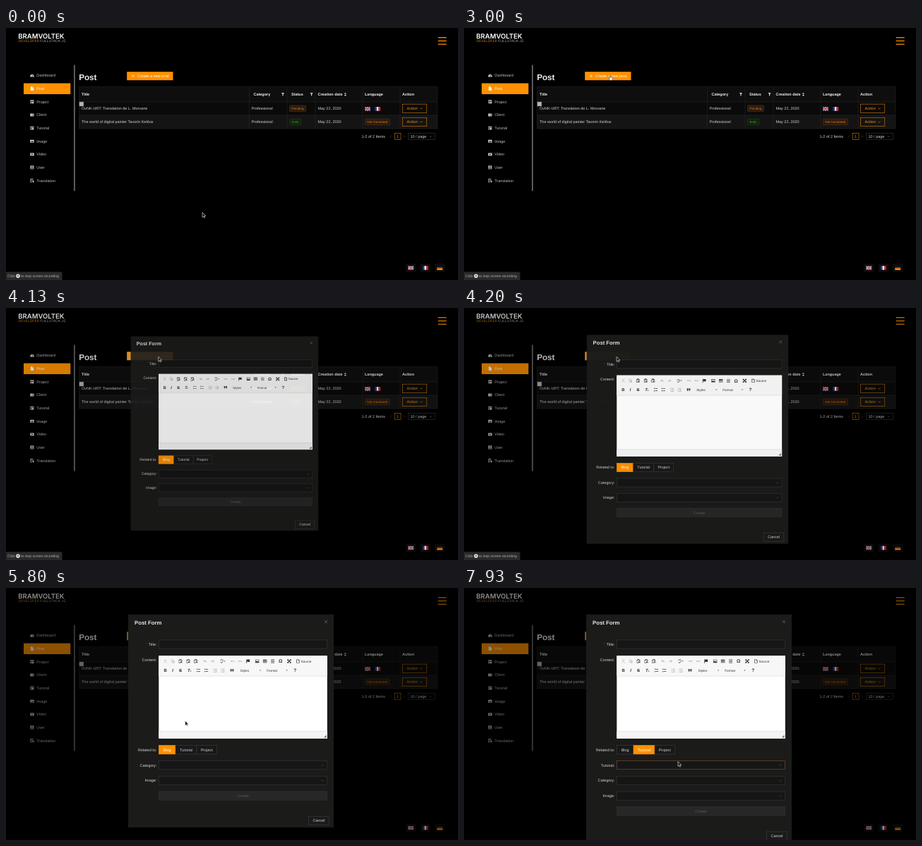
An HTML page for the animation above (8000 ms loop, 640 by 358 pixels).

```html
<!DOCTYPE html>
<html lang="en">
<head>
<meta charset="utf-8">
<title>Post admin</title>
<style>
  html, body { margin: 0; width: 100%; height: 100%; overflow: hidden; background: #000; }
  svg { display: block; width: 100vw; height: 100vh; }
  text { font-family: "Liberation Sans", Arial, sans-serif; text-rendering: geometricPrecision; white-space: pre; }
  .brand { font-family: Inter, sans-serif; }
</style>
</head>
<body>
<svg id="stage" viewBox="0 0 640 358" xmlns="http://www.w3.org/2000/svg"></svg>
<script>
const ORANGE = '#ff9100', LINE = '#2b2b2b', SOFT = '#d4d4d4', BODY = 5.47, ROW = 21.9;

// Drawing helpers
const text = (x, y, s, fill = SOFT, size = BODY, more = '') =>
  `<text x="${x}" y="${y}" fill="${fill}" font-size="${size}" ${more}>${s}</text>`;
const bold = (x, y, s, fill = '#f0f0f0', size = BODY) => text(x, y, s, fill, size, 'font-weight="700"');
const rect = (x, y, w, h, fill = 'none', stroke = 'none', more = '') =>
  `<rect x="${x}" y="${y}" width="${w}" height="${h}" fill="${fill}" stroke="${stroke}" stroke-width=".5" ${more}/>`;
const line = (d, stroke, width = .6, more = '') =>
  `<path d="${d}" fill="none" stroke="${stroke}" stroke-width="${width}" ${more}/>`;
const shape = (d, fill, more = '') => `<path d="${d}" fill="${fill}" fill-rule="evenodd" ${more}/>`;
const chevron = (x, y, color = '#777') => line(`M${x - 1.7} ${y - .8}l1.7 1.7 1.7-1.7`, color, .55);
const group = (s, more = '') => `<g ${more}>${s}</g>`;
const at = (x, y, s) => group(s, `transform="translate(${x} ${y})"`);

const stripes = (colors, down) => colors.map((c, i) => down
  ? rect(0, i * 1.9, 8, 1.9, c) : rect(i * 2.67, 0, 2.67, 5.7, c)).join('');
const flags = {
  uk: rect(0, 0, 8, 5.7, '#1f2f6f') + line('M.4.3L7.6 5.4M7.6.3L.4 5.4', '#ddd', 1) +
      line('M4 0v5.7M0 2.85h8', '#fff', 1.9) + line('M4 0v5.7M0 2.85h8', '#d0142c', 1.1),
  fr: stripes(['#1b3a94', '#fff', '#e0232e']),
  de: stripes(['#111', '#d81e1e', '#f5c400'], true)
};

function tag(x, y, w, s, [fill, border, bg]) {
  return rect(x, y, w, 8.6, bg, border, 'rx=".7"') + text(x + 2.8, y + 6, s, fill, 4.69);
}

function sidebar() {
  const items = [
    ['Dashboard', 'M0 4.8A2.9 2.9 0 1 1 5.6 4.8zM2.4 3.6L4.3 1.9 3.2 4z'],
    ['Post', 'M.7 0h2.6L5 1.7V5.5H.7zM3.2.4v1.5h1.5z'],
    ['Project', 'M.2.3h5v5h-5zM1 1.6v1h3.3v-1zM1 3.4v1h1v-1z'],
    ['Client', 'M0 .7h5.4v4.2H0zM3.3 1.8v.6h1.4v-.6zM3.3 3.2v.6h1.4v-.6z'],
    ['Tutorial', 'M.2.4h5v4.8h-5zM1.1 1.4v2.8h1.1V1.4zM3.1 1.4v1h1.3v-1z'],
    ['Image', 'M0 .7h5.5v4.3H0zM.7 4.2h4L3.5 2.5l-.9 1-.7-.6z'],
    ['Video', 'M.7.7h4.2q.7 0 .7.7v2.8q0 .7-.7.7H.7Q0 4.9 0 4.2V1.4Q0 .7.7.7zM2.1 1.7v2.2L4 2.8z'],
    ['User', 'M.2.2h5v5h-5zM2 1.2v1.5h1.4V1.2zM1.2 3.3v1h3v-1z'],
    ['Translation', 'M.2.3h4.2v.8H1v3.2h1.5v.8H.2zM3.4 2.6h2v2.7h-2zM1.6 2h2v.7h-2z']
  ];
  return rect(25, 78.5, 66.3, 15.5, ORANGE) + rect(96.1, 52.5, 1.6, 179, '#707070') +
    items.map(([label, icon], i) => {
      const y = 67.5 + i * 18.67, color = i === 1 ? '#fff' : '#bdbdbd';
      return at(34.2, y - 2.8, shape(icon, color)) + text(43.2, y + 1.9, label, color);
    }).join('');
}

function table() {
  const heads = [[107, 'Title'], [350.5, 'Category'], [404, 'Status'], [441.5, 'Creation date'], [508, 'Language'], [561, 'Action']];
  const funnel = x => shape(`M${x - 2.1} 92h4.2l-1.5 2v2.4h-1.2v-2.4z`, '#c8c8c8');
  const warm = ['#d87a16', '#5a3a14', '#2b1a0e'];
  const row = (y, title) => text(107, y + 1.9, title) + text(347.5, y + 1.9, 'Professional') +
    text(441.5, y + 1.9, 'May 22, 2020') + rect(561.5, y - 6.2, 34.3, 12.4, 'none', ORANGE) +
    text(567.5, y + 1.9, 'Action', ORANGE) + chevron(588, y, ORANGE);
  return rect(103.5, 83.3, 507.5, 21.7, '#0e0e0e') + rect(103.5, 105, 507.5, 19, '#0a0a0a') +
    rect(103.5, 124, 507.5, 19, '#141414') +
    line('M103.5 83.3H611V143H103.5zM103.5 105H611M103.5 124H611M344.5 83.3V143M398 83.3V143M438 83.3V143M505 83.3V143M558 83.3V143', LINE, .5) +
    heads.map(([x, s]) => bold(x, 96.2, s)).join('') + funnel(392) + funnel(432.6) +
    shape('M478.7 93.7l1.7-1.9 1.7 1.9zM478.7 95l1.7 1.9 1.7-1.9z', '#d0d0d0') +
    row(114.3, 'OvNK-URT: Translation de L. Morvane') +
    row(133.4, 'The world of digital painter Tavorin Keldus') +
    tag(401.5, 110, 23, 'Pending', warm) + tag(401.5, 129.1, 16, 'Activ', ['#49aa19', '#274916', '#122010']) +
    tag(508.5, 129.1, 35, 'Not translated', warm) +
    at(508, 112, flags.uk) + at(522.2, 112, flags.fr) +
    rect(103.9, 105, 6, 6, '#b4b4b4', '#777') +
    text(503.5, 156.2, '1-2 of 2 Items') + line('M545.7 152.7l-1.4 1.5 1.4 1.5M563.5 152.7l1.4 1.5-1.4 1.5', '#555', .5) +
    rect(550.2, 149.6, 8.8, 9, 'none', ORANGE) + text(553.1, 156.1, '1', ORANGE) +
    rect(569.5, 149.6, 38, 9, 'none', '#434343') + text(572.5, 156.2, '10 / page') + chevron(601.3, 154.2);
}

function page() {
  const corner = [[569.2, 'uk'], [589.8, 'fr'], [610.2, 'de']];
  return rect(0, 0, 640, 358, '#000') +
    text(17.3, 15.2, 'BRAMVOLTEK', '#fff', 9.5, 'class="brand" font-weight="600"') +
    text(17.5, 20.3, `<tspan fill="${ORANGE}">DEVELOPER</tspan> FULLSTACK JS`, '#ccc', 5.1, 'class="brand" font-weight="300"') +
    line('M611.7 13.6h12M611.7 18.4h12M611.7 23.2h12', ORANGE, 1.3) + sidebar() +
    bold(103.2, 74, 'Post', '#eee', 11.7) +
    rect(171.2, 62.2, 65.3, 12, ORANGE) + rect(171.2, 62.2, 65.3, 12, '#fff', 'none', 'id="glow" opacity="0"') +
    line('M177.8 68.2h4.4M180 66v4.4', '#fff', .5) + text(186, 70.2, 'Create a new post', '#fff') + table() +
    corner.map(([x, f]) => rect(x - 2.4, 335.6, 12.8, 10.4, '#0b0b0b', '#1c1c1c') + at(x, 337.9, flags[f])).join('');
}

function recorder() {
  return shape('M0 346.5h78q1.5 0 1.5 1.5v10H0z', '#2a2a2a') + text(2, 354, 'Click', '#b0b0b0', 5.03) +
    '<circle cx="17" cy="352.2" r="2.8" fill="#e4e4e4"/>' + line('M16 351.2l2 2M18 351.2l-2 2', '#222', .7) +
    text(21, 354, 'to stop screen recording', '#b0b0b0', 5.03);
}

function editor() {
  const ink = '#333', pale = '#bbb';
  const clip = 'M-2.3-2.2h4.6v5h-4.6zM-1.7-1.2v3.4h3.4v-3.4zM-1-3h2v1.2h-2zM0 .2h2.6v2.6H0z';
  const list = 'M-2.5-2.3h1.2v1.2h-1.2zM-.6-2h3.1v.7H-.6zM-2.5 1h1.2v1.2h-1.2zM-.6 1.3h3.1V2H-.6z';
  const indent = 'M-2.5-2.3h5v.7h-5zM-.2-.8h2.7v.7H-.2zM-.2.7h2.7v.7H-.2zM-2.5 2h5v.7h-5zM-2.4-1v2.2L-.9.1z';
  const link = 'M-2.6-1h2.2v2h-2.2zM-2-.4v.8h1v-.8zM.4-1h2.2v2H.4zM1-.4v.8h1v-.8zM-.8-.3H.8v.6H-.8z';
  const curve = 'M-2.5-.3L-.5-2v1.1q2.6 0 3 2.5Q1.2.4-.5.6v1.2z';
  const icons = [
    [236, 104, 'M-2.3-2.5H1V1h-3.3zM-1.7-1.9V.4H.4v-2.3zM1.2-1h1.2v3.6H-1V1.4H1.2z', pale],
    [247, 104, clip], [258, 104, clip], [268.7, 104, clip], [282, 104, curve, pale],
    [320.6, 104, link, pale], [331.6, 104, link, pale],
    [342.6, 104, 'M-2.4-2.6h.7v5.6h-.7zM-1.5-2.4h4V1h-4z'],
    [355.6, 104, 'M-2.7-2.3h5.4v4.6h-5.4zM-2.1-1.7v2.8L-.6-.6.5.6l.7-.7.9 1v-2.6z'],
    [366.6, 104, 'M-2.7-2.3h5.4v4.6h-5.4zM-2.1-.9V.1h1.9v-1zM.4-.9V.1h1.7v-1zM-2.1.7v1h1.9v-1zM.4.7v1h1.7v-1z'],
    [377.6, 104, 'M-2.5-2.4h5v.6h-5zM-2.5-.5h5V.5h-5zM-2.5 1.8h5v.6h-5z'],
    [401, 104, 'M-2.7-2.7H-.5L-1.2-2 0-.8 1.2-2 .5-2.7h2.2V-.5L2-1.2.8 0 2 1.2l.7-.7v2.2H.5L1.2 2 0 .8-1.2 2l.7.7h-2.2V.5l.7.7L-.8 0-2-1.2l-.7.7z'],
    [413.4, 104, 'M-2.2-2.6h3l1.4 1.4v3.8h-4.4zM-1.5-1.9v3.8h3v-2.7H.3v-1.1z'],
    [272.6, 117, list], [283.6, 117, list], [296.2, 117, indent, pale], [307, 117, indent, pale],
    [320, 117, 'M-2.4-1.8h2v2.2l-1 1.6h-.8l.6-1.6h-.8zM.4-1.8h2v2.2l-1 1.6H.6L1.2.4H.4z'],
    ...[[309.6, 104], [360, 117], [397.6, 117]].map(([x, y]) => [x, y, 'M-1.1-.5h2.2L0 .8z'])
  ];
  const put = (x, s, more = '', size = 6) => text(x, 119, s, ink, size, more);
  return rect(216.3, 96.2, 238.5, 117.6, '#fff') + rect(216.3, 96.2, 238.5, 28.9, '#f7f7f7') +
    rect(216.3, 203.6, 238.5, 10.2, '#f5f5f5') + line('M216.3 125.2h238.5M216.3 203.6h238.5', '#cfcfcf', .5) +
    shape('M453.6 208.8v3.8h-3.8z', '#777') +
    icons.map(([x, y, d, c = ink]) => at(x, y, shape(d, c))).join('') +
    group(shape(curve, pale), 'transform="translate(292.4 104) scale(-1 1)"') +
    line('M224 101.3l2.6 4M227.2 101.3l-2.6 4M223.4 106.2h1M226.8 106.2h1', pale, .8) +
    line('M303.8 105.2l1.2 1.4 2.6-3', ink, .8) + text(303, 103.3, 'abc', ink, 3.2) +
    text(385.9, 106.3, 'Ω', ink, 6.8, 'font-weight="700"') + text(417.5, 105.7, 'Source', ink, 4.7) +
    put(223.5, 'B', 'font-weight="700"') + put(235.2, 'I', 'font-weight="700" font-style="italic"') +
    put(245, 'S', 'font-weight="700" text-decoration="line-through"') +
    put(257, 'T', 'font-weight="700" font-style="italic"') + put(260.4, 'x', '', 4) +
    put(331.5, 'Styles', '', 4.7) + put(369.2, 'Format', '', 4.7) + put(407.2, '?', 'font-weight="700"', 6.6);
}

function modal() {
  const label = (y, s) => text(213.3, y + 1.9, s + ':', SOFT, BODY, 'text-anchor="end"');
  const field = (y, more = '') => rect(216.4, y - 6.1, 238.2, 12.2, '#161616', '#3c3c3c', more);
  const select = (y, s, more) => label(y, s) + field(y, more) + chevron(448.2, y + .2, '#5a5a5a');
  const middle = 'text-anchor="middle"';
  const radio = (x, w, s, id) => rect(x, 223.4, w, 12.6, '#191919', '#434343', `id="${id}Box"`) +
    text(x + w / 2, 231.6, s, SOFT, BODY, middle + ` id="${id}"`);
  const lower = select(251.6, 'Category') + select(273.3, 'Image') +
    rect(216.4, 289, 238.2, 12.2, '#272727', '#383838') + text(335.5, 297, 'Create', '#5c5c5c', BODY, middle) +
    rect(428.3, 324.2, 29.3, 12.4, 'none', '#434343') + text(443, 332.3, 'Cancel', SOFT, BODY, middle);
  return rect(173, 37.6, 291, 302.6, '#1b1b1a', 'none', 'id="panel"') +
    bold(182, 51.5, 'Post Form', '#e6e6e6', 7.8) + line('M451 45.9l4 4M455 45.9l-4 4', '#808080', .6) +
    text(197.2, 81.4, '*', '#a33', 4.5) + label(80, 'Title') + field(80) + label(102, 'Content') + editor() +
    label(229.7, 'Related to') + radio(216.3, 23.7, 'Blog', 'blog') + radio(240, 30, 'Tutorial', 'tutorial') +
    radio(270, 28.4, 'Project', 'project') +
    group(select(251.6, 'Tutorial', 'id="extraField"'), 'id="extra"') + group(lower, 'id="lower"');
}

const arrow = shape('M0 0v6.9l1.6-1.5 1 2.3 1.1-.5-1-2.2h2.2z', '#111', 'stroke="#eee" stroke-width=".6"');
const hand = shape('M-.7.4Q0-.5.6.4v2l2.4.5q.7.2.6 1L3 6.8H-.4L-2.3 4.2q0-.9.8-.5l.8.6z', '#fff', 'stroke="#222" stroke-width=".5"');

const stage = document.getElementById('stage');
stage.innerHTML = group(page()) + rect(0, 0, 640, 358, '#000', 'none', 'id="mask" opacity="0"') +
  group(recorder(), 'id="recorder"') + group(modal(), 'id="modal"') +
  group(group(arrow, 'id="arrow"') + group(hand, 'id="hand"'), 'id="pointer"');
const el = Object.fromEntries([...stage.querySelectorAll('[id]')].map(n => [n.id, n]));
const set = (id, attrs) => { for (const k in attrs) el[id].setAttribute(k, attrs[k]); };

// Pointer path: time, x, y
const path = [
  [0, 278, 262], [600, 278, 262], [800, 135, 127], [934, 135, 127], [1000, 131, 120], [1133, 215, 62],
  [1200, 280, 49], [1267, 311, 70], [1534, 311, 70], [1600, 311, 75], [1800, 306, 104], [2000, 275, 100],
  [2200, 235, 75], [2400, 211, 62], [2600, 206, 60], [2800, 209, 66], [3000, 207, 67.5], [3200, 207, 67.5],
  [3534, 213, 68], [3734, 213, 68], [3800, 215, 69], [4600, 217, 69.5], [4800, 235, 120], [5000, 252, 170],
  [5600, 252, 170], [6200, 257, 226], [6467, 257, 229], [7067, 289, 228], [7600, 289, 228], [7934, 303, 246.5]
];
const ramp = (t, from, span) => Math.min(1, Math.max(0, (t - from) / span));
const mix = (a, b, p) => `rgb(${a.map((v, i) => Math.round(v + (b[i] - v) * p))})`;
const OR = [255, 145, 0], DARK = [25, 25, 25], GREY = [67, 67, 67], PALE = [212, 212, 212], WHITE = [255, 255, 255];

function pointerAt(t) {
  const i = path.findIndex(k => k[0] > t);
  if (i < 0) return path[path.length - 1].slice(1);
  const [a, b] = [path[i - 1], path[i]], p = ramp(t, a[0], b[0] - a[0]);
  return [a[1] + (b[1] - a[1]) * p, a[2] + (b[2] - a[2]) * p];
}

function draw(t) {
  const [x, y] = pointerAt(t);
  const isHand = (t >= 2333 && t < 3790) || (t >= 6130 && t < 7720);
  set('pointer', { transform: `translate(${x} ${y})` });
  set('arrow', { visibility: isHand ? 'hidden' : 'visible' });
  set('hand', { visibility: isHand ? 'visible' : 'hidden' });
  set('glow', { opacity: .2 * ramp(t, 3200, 330) });

  // The dialog zooms out of the click point
  const p = ramp(t, 3990, 400), ease = 1 - (1 - p) ** 5;
  set('mask', { opacity: .45 * p });
  set('modal', { opacity: ease, transform: `translate(214 68) scale(${.2 + .8 * ease}) translate(-214 -68)` });
  set('recorder', { opacity: 1 - ramp(t, 4250, 200) });

  const open = t >= 6395;
  set('panel', { height: 302.6 + (open ? ROW : 0) });
  set('lower', { transform: `translate(0 ${open ? ROW : 0})` });
  set('extra', { visibility: open ? 'visible' : 'hidden' });
  set('extraField', { stroke: mix([60, 60, 60], [165, 90, 35], ramp(t, 7730, 150)) });

  const pick = ramp(t, 6420, 300), hover = ramp(t, 6130, 200);
  const aim = ramp(t, 6800, 200) * (1 - ramp(t, 7700, 150));
  set('blogBox', { fill: mix(OR, DARK, pick), stroke: mix(OR, GREY, pick) });
  set('blog', { fill: mix(WHITE, PALE, pick) });
  set('tutorialBox', { fill: mix(DARK, OR, ramp(t, 6480, 240)), stroke: mix(GREY, OR, pick) });
  set('tutorial', { fill: t < 6480 ? mix(PALE, OR, hover) : mix(OR, WHITE, ramp(t, 6480, 240)) });
  set('project', { fill: mix(PALE, OR, aim) });
}

const LOOP = 8000, STEP = 1000 / 15, start = performance.now();
function tick() {
  const t = (performance.now() - start) % LOOP;
  draw(Math.floor((t + 5) / STEP) * STEP % LOOP);
  requestAnimationFrame(tick);
}
tick();
</script>
</body>
</html>
```
